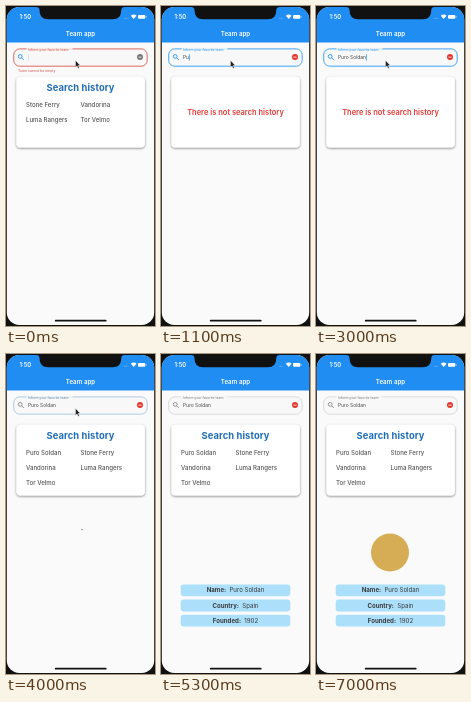
Write an HTML page that moves like this. It is 149 by 320 pixels and loops after 7.6 s.

```html
<!DOCTYPE html>
<html lang="en">
<head>
<meta charset="utf-8">
<title>Team app</title>
<style>
  html, body { margin: 0; width: 100%; height: 100%; overflow: hidden; background: #111; }
  svg { display: block; width: 100vw; height: 100vh; font-family: Inter, Roboto, sans-serif; }
  .mid { text-anchor: middle; }
  .bold { font-weight: 700; }
  .semi { font-weight: 600; }
</style>
</head>
<body>
<svg viewBox="0 0 149 320">
  <defs>
    <clipPath id="screen"><rect x="0.8" y="1.1" width="147.4" height="317.8" rx="12.5"/></clipPath>
    <filter id="shadow" x="-10%" y="-10%" width="120%" height="125%">
      <feDropShadow dx="0" dy="0.9" stdDeviation="1.1" flood-color="#000" flood-opacity="0.5"/>
    </filter>
  </defs>
  <g clip-path="url(#screen)">
    <rect width="149" height="320" fill="#fafafa"/>
    <rect width="149" height="36.5" fill="#208df2"/>
    <path d="M30 1q3.5 0 3.5 3.2q0 9 8.6 9H106.7q8.6 0 8.6-9q0-3.2 3.5-3.2z" fill="#111"/>
    <g fill="#fff">
      <text class="semi" x="13.4" y="13" font-size="5.8">1:50</text>
      <path d="M124.8 9.8q2.9-2.7 5.8 0l-2.9 3.3z"/>
      <rect x="132" y="9" width="7.3" height="3.8" rx="1"/>
      <rect x="139.8" y="10.2" width="0.6" height="1.4"/>
      <path d="M118 12.3h4.4" stroke="#fff" stroke-width="0.7" stroke-dasharray="0.7 0.5" opacity="0.5"/>
      <text class="semi mid" x="74.5" y="30.2" font-size="6.1" letter-spacing="0.08">Team app</text>
    </g>

    <rect id="field" x="7.7" y="42.9" width="133.5" height="17.3" rx="6" fill="#f8f8f8"/>
    <rect id="gap" x="20.5" y="42.2" width="46" height="1.5" fill="#f9f9f9"/>
    <text id="label" x="22" y="44.8" font-size="3.4">Inform your favorite team</text>
    <g id="lens" fill="none" stroke-width="0.9">
      <circle cx="14.2" cy="50.4" r="1.9"/>
      <path d="M15.6 51.8l2.2 2.2"/>
    </g>
    <text id="typed" x="22" y="53.2" font-size="4.9" fill="#444"></text>
    <rect id="caret" y="48.2" width="0.7" height="6.4" fill="#2196f3"/>
    <circle id="clear" cx="134" cy="51.1" r="3"/>
    <rect x="132.4" y="50.7" width="3.2" height="0.8" fill="#fff"/>
    <text id="error" x="12" y="66.2" font-size="3.45" fill="#d8574e">Team cannot be empty</text>

    <rect x="10.4" y="70.8" width="128.5" height="70.7" rx="4" fill="#fff" filter="url(#shadow)"/>
    <g id="history">
      <text class="bold mid" x="74.5" y="85" font-size="9.4" letter-spacing="0.1" fill="#1f6db6">Search history</text>
      <g id="teams" font-size="6.1" font-weight="500" fill="#555"></g>
    </g>
    <text id="none" class="semi mid" x="74.5" y="109.1" font-size="7.5" fill="#e53935">There is not search history</text>

    <path id="spinner" fill="none" stroke="#66727a" stroke-width="1.2"/>
    <g id="results"></g>
    <circle id="crest" cx="74" cy="198.5" r="19" fill="#d6ad55"/>
    <path id="pointer" d="M69.4 54.2v7.2l1.6-1.4 1.2 2.6 1.2-.6-1.2-2.5h2.2z" fill="#222" stroke="#fff" stroke-width="0.5"/>
    <rect x="48.8" y="313.7" width="51.8" height="1.9" rx="0.95" fill="#111"/>
  </g>
</svg>
<script>
const LOOP = 7600, TYPE = 900, KEY_GAP = 200, SUBMIT = 3900, LOAD = 3950, LEAVE = 4600, RESULT = 5300, CREST = 6500;
const TEAM = 'Puro Soldan';
const PAST = ['Stone Ferry', 'Vandorina', 'Luma Rangers', 'Tor Velmo'];
const RED = [216, 80, 70], BLUE = [33, 150, 243], GREY = [195, 198, 200], DARK = [125, 125, 125];

const $ = id => document.getElementById(id);
const clamp = v => Math.max(0, Math.min(1, v));
const ramp = (t, from, length) => clamp((t - from) / length);
const mix = (a, b, k) => `rgb(${a.map((v, i) => Math.round(v + (b[i] - v) * k))})`;
const show = (id, on) => $(id).setAttribute('opacity', +on);
const set = (id, name, value) => $(id).setAttribute(name, value);

// Cubic bezier (0.4, 0, 0.2, 1), solved by bisection
function ease(x) {
  let lo = 0, hi = 1, s = 0.5;
  for (let i = 0; i < 18; i++) {
    s = (lo + hi) / 2;
    const bx = 1.2 * s * (1 - s) ** 2 + 0.6 * s * s * (1 - s) + s ** 3;
    if (bx < x) lo = s; else hi = s;
  }
  return 3 * s * s * (1 - s) + s ** 3;
}

function arc(ms) {
  const p = ms / 1333 % 1, cx = 74.3, cy = 180.8, r = 5.6;
  const head = ease(clamp(p * 2)), tail = ease(clamp(p * 2 - 1));
  const a = -Math.PI / 2 + Math.PI * (tail * 1.5 + ms / 2222 * 2 + p / 2);
  const sweep = Math.max((head - tail) * 1.5 * Math.PI, 0.2);
  const at = q => `${cx + r * Math.cos(q)} ${cy + r * Math.sin(q)}`;
  return `M${at(a)}A${r} ${r} 0 ${+(sweep > Math.PI)} 1 ${at(a + sweep)}`;
}

function listTeams(names) {
  $('teams').innerHTML = names.map((name, i) =>
    `<text x="${i % 2 ? 74.5 : 20}" y="${100.5 + 15.4 * (i >> 1)}">${name}</text>`).join('');
}

$('results').innerHTML = [['Name', TEAM], ['Country', 'Spain'], ['Founded', '1902']].map(([key, value], i) => {
  const y = 230.4 + 15.2 * i;
  return `<rect x="19.7" y="${y}" width="109.6" height="11.8" rx="3" fill="#abdffa"/>
    <text class="mid" x="74.5" y="${y + 8}" font-size="6.1" fill="#3a3a3a"><tspan class="bold">${key}:</tspan><tspan dx="3.4">${value}</tspan></text>`;
}).join('');

let saved = null;

function draw(t) {
  const typing = t >= TYPE, sent = t >= SUBMIT;
  const wake = ramp(t, TYPE, 167), blur = ramp(t, SUBMIT, 150);
  const tint = sent ? mix(BLUE, GREY, blur) : mix(RED, BLUE, wake);

  set('field', 'stroke', tint);
  set('field', 'stroke-width', 0.85 - 0.25 * blur);
  set('label', 'fill', sent ? mix(BLUE, DARK, blur) : tint);
  set('lens', 'stroke', sent ? '#888' : '#2196f3');
  set('clear', 'fill', typing ? '#e5352b' : '#777');
  show('error', 1 - wake);

  const count = typing ? Math.min(TEAM.length, Math.floor((t - TYPE) / KEY_GAP) + 1) : 0;
  const text = TEAM.slice(0, count);
  if ($('typed').textContent !== text) $('typed').textContent = text;
  set('caret', 'x', 22.2 + (count ? $('typed').getComputedTextLength() : 0));
  const blink = Math.max(0.25 - t / 400, ramp(t, 350, 250));
  show('caret', sent ? 0 : typing ? 1 : blink);

  if (saved !== sent) listTeams(sent ? [TEAM, ...PAST] : PAST);
  saved = sent;
  show('history', !typing || sent);
  show('none', typing && !sent);

  const loading = t >= LOAD && t < RESULT;
  show('spinner', loading);
  if (loading) set('spinner', 'd', arc(t - LOAD));
  show('pointer', t < LEAVE);
  show('results', t >= RESULT);
  show('crest', t >= CREST);
}

const start = performance.now();
function tick() {
  draw((performance.now() - start) % LOOP);
  requestAnimationFrame(tick);
}
tick();
</script>
</body>
</html>
```
